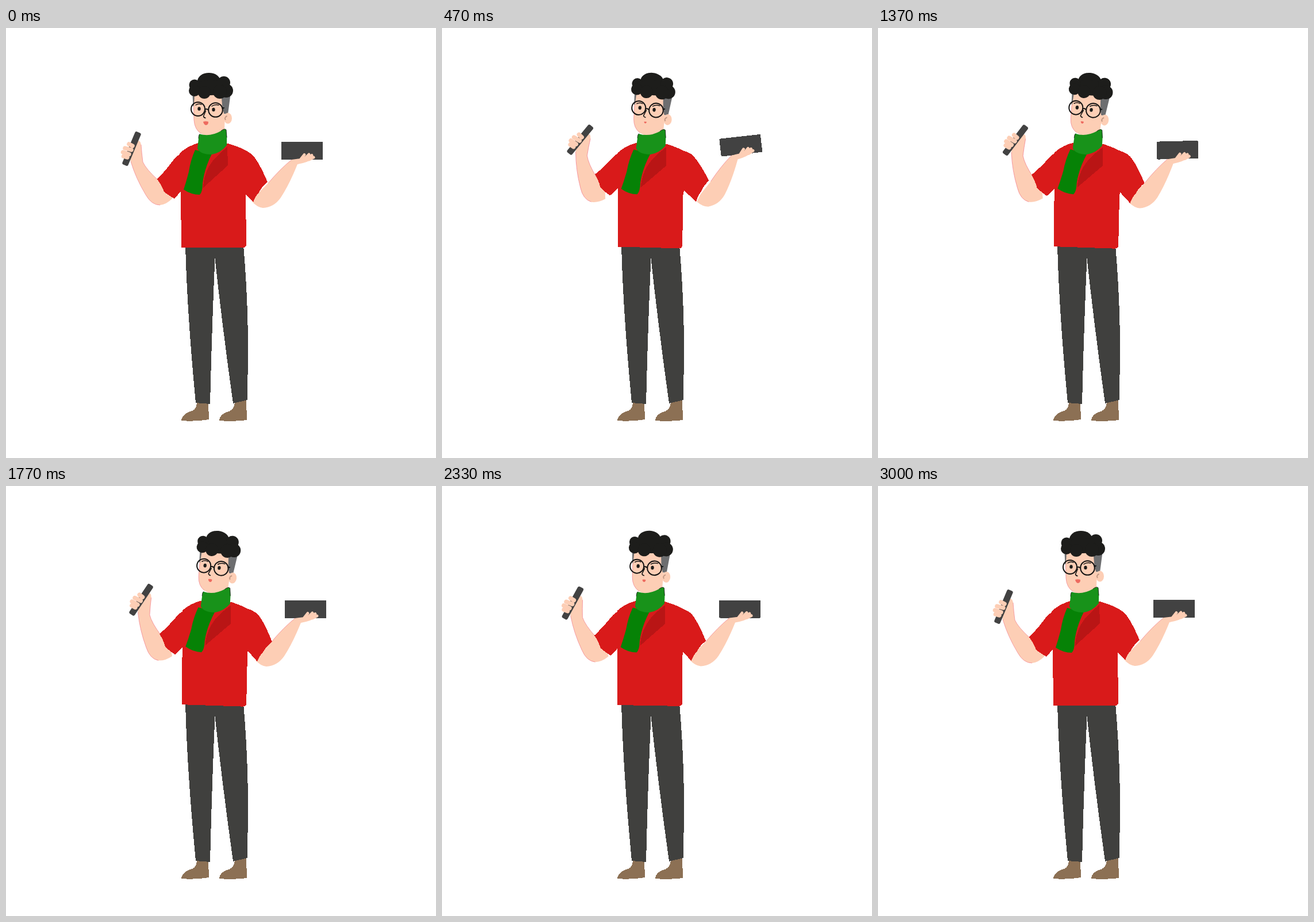
Animation of 748 by 748 pixels, one loop 3030 ms. Source, as an HTML page:

```html
<!DOCTYPE html>
<html lang="en">
<head>
<meta charset="utf-8">
<title>Man with phone and box</title>
<style>
html, body { margin: 0; width: 100%; height: 100%; overflow: hidden; background: #fff; }
svg { display: block; width: 100vw; height: 100vh; }
.crisp { shape-rendering: crispEdges; }
.skin { fill: #fdceb5; }
.edge { fill: none; stroke: #f2808f; stroke-width: .7; }
.finger { fill: none; stroke: #fdceb5; stroke-linecap: round; }
.red { fill: #d91a1a; }
.dark { fill: #40403e; }
.device { fill: #424242; }
.black { fill: #1d1d1b; }
.grey { fill: #6d6e70; }
.line { fill: none; stroke: #111; stroke-linecap: round; }
</style>
</head>
<body>
<svg viewBox="0 0 748 748">
  <g class="crisp">
    <g fill="#8c7054">
      <path d="M332 652L352 653L353 681Q330 685 305 683Q306 671 324 666Q331 663 332 652Z"/>
      <path d="M398 651L418 647L419 682Q395 685 371 683Q372 671 388 667Q397 663 398 651Z"/>
    </g>
    <path class="dark" d="M312 378H413Q421 470 421 560L420 647L395 653Q377 525 363.5 401Q358 525 355 654L330 652Q315 495 312 378Z"/>
  </g>

  <g id="foreL">
    <path class="skin" d="M217 232Q226 262 243 290Q253 308 268 308Q279 307 290 296L278 262L264 264Q244 246 238 233Q236 218 235 203Q233 193 228 198Q218 197 212 212Z"/>
    <path class="edge" d="M217 232Q226 262 243 290Q253 308 268 308M264 264Q244 246 238 233Q236 218 235 203"/>
    <rect class="device" x="213" y="179" width="11" height="62" rx="3" transform="rotate(22.8 218.5 210)"/>
    <path class="finger" stroke-width="7.5" d="M214 202L220 205M207 209L218 212M203.500 216L214 219.500M204.500 223L211 225"/>
  </g>
  <g id="foreR">
    <rect class="device crisp" x="479" y="198" width="72" height="31" rx="1.500"/>
    <path class="skin" d="M497 229Q477 245 456 270L436 290L428 302Q437 312 447 313Q466 312 478 295Q493 272 507 237Q525 234 534 227L513 227Z"/>
    <path class="edge" d="M497 229Q477 245 456 270"/>
    <path class="finger" stroke-width="5" d="M513 228L519 220.500M518 229L527 220M523 229L532 221.500M527 229L535 225"/>
  </g>

  <g class="red crisp">
    <path id="sleeveL" d="M324 214Q303 214 291 230Q277 249 263 263Q270 272 275 285Q284 292 293 297L318 268Z"/>
    <path id="sleeveR" d="M395 208Q420 212 430 222Q441 235 455 268Q445 276 440 286Q434 292 430 303L404 275Z"/>
  </g>
  <g class="torso crisp">
    <path class="red" d="M335 200Q316 205 302 218L303.500 285L305.500 382H412Q418 382 418 376L417 289L429 222Q420 211 386 201Z"/>
    <path fill="#b91515" d="M385 207L386 239L343 278Q344 250 362 228Q372 217 385 207Z"/>
  </g>

  <g id="head">
    <path class="skin" d="M325 112L327 160Q328 177 340 184Q356 194 380 178L382 112Z"/>
    <path class="edge" d="M326.500 135L327 160Q328 177 340 184"/>
    <path class="grey" d="M324.500 116H328L327 136H325.500ZM375 116H390.500L386 150L379 149Q375 135 375 116Z"/>
    <ellipse class="skin" cx="386" cy="157" rx="7" ry="9.500"/>
    <path fill="none" stroke="#c49a85" stroke-width="2" d="M384.500 153Q379 156 382 160"/>
    <g class="black">
      <ellipse cx="353" cy="92.500" rx="20" ry="14.500"/>
      <ellipse cx="356" cy="104" rx="32" ry="13"/>
      <circle cx="328" cy="99" r="9.500"/>
      <circle cx="328" cy="109" r="10"/>
      <circle cx="379" cy="95" r="11"/>
      <circle cx="383" cy="109" r="12"/>
      <circle cx="345" cy="112" r="11"/>
      <circle cx="372" cy="111" r="12"/>
      <ellipse cx="336" cy="140.500" rx="2.700" ry="3.300"/>
      <ellipse cx="361" cy="142" rx="2.700" ry="3.300"/>
    </g>
    <g class="line" stroke-width="2">
      <circle cx="334" cy="141" r="12"/>
      <circle cx="364.500" cy="142.500" r="12.300"/>
      <path d="M346 141.500Q349 140 352 142.500M376.500 139.500L379 139"/>
      <path stroke-width="1.500" d="M330 134Q335 130.500 340 133M358 136Q363 132.500 370 134M347.500 144L343.500 153.500Q344 156 347 156.500"/>
    </g>
    <path id="mouth" fill="#ee6a5f" d="M343 163Q347.500 161.500 352 163Q352 169 347.500 169Q344 168 343 163Z"/>
  </g>

  <g class="torso">
    <path fill="#068206" d="M329 212Q321 230 318 250Q314 266 309 281Q322 290 337 290Q342 285 342 270Q345 245 358 219Z"/>
    <path fill="#18921a" d="M337 184.500Q335 186 335 192L333 210Q338 220 358 220Q374 217 384 204Q385 190 383 177Q380 174 374 179Q355 190 337 184.500Z"/>
    <path class="line" stroke-width=".8" d="M337 184.500Q335 186 335 192M374 179Q380 174 383 177L384 190"/>
  </g>
</svg>
<script>
const LOOP = 3030;
const $ = id => document.getElementById(id);
const torso = document.querySelectorAll('.torso');
const clamp = u => Math.min(1, Math.max(0, u));
const ease = u => (1 - Math.cos(Math.PI * clamp(u))) / 2;

// Shift by (x, y) and turn by a degrees around the point (px, py)
function move(id, px, py, x, y, a) {
  $(id).setAttribute('transform', `translate(${x} ${y}) rotate(${a} ${px} ${py})`);
}

function draw(now) {
  const t = now % LOOP;
  const lean = ease(t / 667) - ease((t - 1667) / 1333);    // body and head
  const swing = ease(t / 600) - clamp((t - 900) / 2100);   // phone arm, sinks slowly
  const lift = ease(t / 480) - ease((t - 500) / 1270);     // box arm, quick raise

  move('foreL', 218.5, 210, 5 * lean + 20 * swing, -4 * lean - 14 * swing, 18.7 * swing);
  move('sleeveL', 263, 263, 4 * lean, -9.5 * swing, 7 * swing);
  move('foreR', 514.5, 213.5, 6 * lean, lean - 10 * lift, -6.4 * lift);
  move('sleeveR', 455, 268, 8 * lean + 3 * lift, 3 * lean - 5 * lift, 1.5 * lean - 5.5 * lift);
  move('head', 361, 235, 0, 0, 6.2 * lean);
  torso.forEach(g => g.setAttribute('transform', `rotate(${1.9 * lean} 362 382)`));

  const open = .75 + .25 * Math.cos(6 * Math.PI * t / LOOP);
  $('mouth').setAttribute('transform',
    `translate(347.5 165) scale(${open}) translate(-347.5 -165)`);
  requestAnimationFrame(() => draw(performance.now()));
}
draw(0);
</script>
</body>
</html>
```
